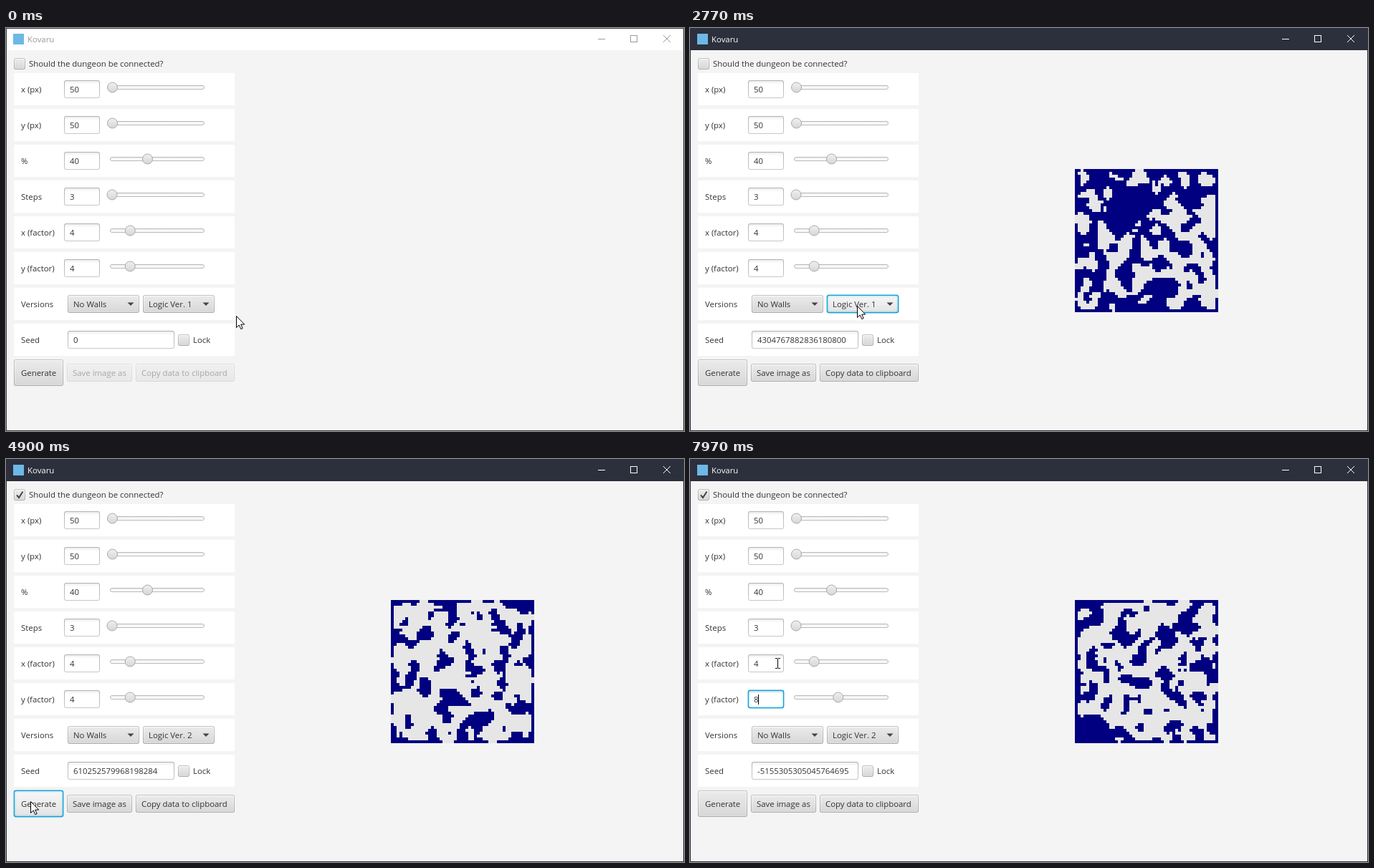
Recreate the animation shown at these times as an HTML page. Size 946 by 563 pixels, loop 8000 ms.

```html
<!DOCTYPE html>
<html lang="en">
<head>
<meta charset="utf-8">
<title>Dungeon generator</title>
<style>
  html, body { margin: 0; width: 100%; height: 100%; overflow: hidden; background: #f4f4f4; }
  svg { display: block; width: 946px; height: 563px; }
  text { font: 11.4px "Open Sans", "Noto Sans", sans-serif; fill: #333; white-space: pre; }
  .ring { display: none; fill: none; stroke: #039ed3; }
  .ring.on { display: inline; }
  .crisp { shape-rendering: crispEdges; }
</style>
</head>
<body>
<svg id="stage" viewBox="0 0 946 563"></svg>
<script>
const LOOP = 8000;
const stage = document.getElementById('stage');
const $ = id => document.getElementById(id);

// ---------- markup helpers ----------
const rect = (x, y, w, h, fill, more = '') =>
  `<rect x="${x}" y="${y}" width="${w}" height="${h}" fill="${fill}" ${more}/>`;
const inset = (d, x, y, w, h, fill, more) => rect(x + d, y + d, w - 2 * d, h - 2 * d, fill, more);
const text = (x, y, s, more = '') => `<text x="${x}" y="${y}" ${more}>${s}</text>`;
const gradient = (id, from, to, end = 1) => `<linearGradient id="${id}" x2="0" y2="1">
  <stop stop-color="${from}"/><stop offset="${end}" stop-color="${to}"/></linearGradient>`;

const ring = (id, ...box) => `<g class="ring" id="${id}Ring">
  ${inset(.4, ...box, 'none', 'rx="2.6" stroke-width="1.2"')}
  ${inset(.8, ...box, 'none', 'rx="2.2" stroke-width="4.4" opacity=".13"')}</g>`;

const buttons = {}, fields = [];
function button(id, ...box) {
  buttons[id] = box;
  return inset(0, ...box, 'url(#edge)', 'rx="3"') + inset(1, ...box, 'url(#shine)', 'rx="2"') +
    inset(2, ...box, 'url(#face)', `rx="1.5" id="${id}Face"`) + ring(id, ...box);
}
const labelled = (id, x, y, w, h, pad, s) =>
  `<g id="${id}">${button(id, x, y, w, h)}${text(x + pad, y + (h - 1) / 2 + 5, s)}</g>`;
const combo = (id, x, s) => button(id, x, 373, 100, 25) +
  text(x + 8, 390, s, `id="${id}Text"`) + `<path d="M${x + 83.5} 383.500h9l-4.500 4.500z" fill="#444"/>`;

function field(id, x, y, w, value) {
  const box = [x, y, w, 25];
  fields.push(box);
  return inset(0, ...box, 'url(#fieldEdge)', 'rx="3"') + inset(1, ...box, 'url(#well)', 'rx="2"') +
    ring(id, ...box) + rect(x + 7, y + 5, 8, 15, '#0096c9', `id="${id}Sel" display="none"`) +
    text(x + 8, y + 17, value, `id="${id}Text"`);
}
const slider = (id, y, at) =>
  rect(145.5, y + 17.5, 131, 5, 'url(#groove)', 'rx="2.5" stroke="#b8b8b8"') +
  `<circle id="${id}Thumb" cx="${at}" cy="${y + 20}" r="7" fill="url(#thumb)" stroke="#aaa"/>`;

// ---------- window ----------
const thumbX = factor => 148 + 8.4 * (factor - 1);
const rows = [
  ['x (px)', 'w', 50, 148.5], ['y (px)', 'h', 50, 148.5], ['%', 'p', 40, 197.5],
  ['Steps', 's', 3, 148], ['x (factor)', 'xf', 4, thumbX(4)], ['y (factor)', 'yf', 4, thumbX(4)],
  ['Versions'], ['Seed']
].map(([name, id, value, at], i) => {
  const y = 63 + 50 * i;
  return rect(11, y, 308, 45, '#fff') + text(21, y + 27, name) +
    (id ? field(id, 81, y + 10, 50, value) + slider(id, y, at) : '');
}).join('');

stage.innerHTML = `<defs>
    ${gradient('edge', '#c2c2c2', '#a9a9a9')}
    ${gradient('shine', '#fbfbfb', '#e0e0e0')}
    ${gradient('face', '#eaeaea', '#d8d8d8')}
    ${gradient('lit', '#f6f6f6', '#e5e5e5')}
    ${gradient('fieldEdge', '#b2b2b2', '#c8c8c8')}
    ${gradient('well', '#ededed', '#fff', .2)}
    ${gradient('groove', '#eee', '#fff')}
    ${gradient('thumb', '#f0f0f0', '#d6d6d6')}
  </defs>
  ${rect(0, 0, 946, 563, '#f4f4f4')}
  ${rect(0, 0, 946, 31, '#fff', 'id="bar"')}
  ${rect(.5, .5, 945, 562, 'none', 'id="frame"')}
  ${rect(10, 8, 15, 15, '#6db8e6')}
  ${text(30, 20, 'Kovaru', 'id="title"')}
  <g id="winIcons" fill="none">
    <path class="crisp" d="M826 15.500h10M871.500 10.500h9v9h-9z"/>
    <path d="M917 10l10 10M927 10l-10 10"/>
  </g>
  ${button('connect', 11, 42, 16, 16)}
  <path id="tick" d="M15 50.300l3 3.700 5.500-8.500" fill="none" stroke="#444" stroke-width="2"/>
  ${text(32, 54, 'Should the dungeon be connected?')}
  ${rows}
  ${combo('walls', 86, 'No Walls')}
  ${combo('logic', 191, '')}
  ${field('seed', 86, 423, 149, 0)}
  ${button('lock', 240, 428, 16, 16)}
  ${text(261, 440, 'Lock')}
  ${labelled('gen', 11, 463, 69, 37, 10, 'Generate')}
  ${labelled('save', 85, 469, 91, 25, 8, 'Save image as')}
  ${labelled('copy', 181, 469, 138, 25, 8, 'Copy data to clipboard')}
  ${rect(95, 329, 1, 14, '#000', 'id="caret"')}
  <g id="map" class="crisp">${rect(537, 197, 200, 200, '#e6e6e6')}<path id="cells" fill="#000080"/></g>
  <path id="arrow" d="M.5.500v16l3.700-3.500 2.600 5.600 2.400-1.100-2.500-5.400h5z" fill="#fff" stroke="#000"/>
  <path id="beam" class="crisp" d="M-3-7h3M1-7h3M.5-6.500v13M-3 7h3M1 7h3" fill="none" stroke="#000"/>`;

// ---------- caves: seeded noise smoothed by a cellular automaton ----------
function randomFrom(seed) {
  let n = [...seed].reduce((a, c) => Math.imul(a, 31) + c.charCodeAt(0) | 0, 7);
  return () => {
    n = n + 0x6d2b79f5 | 0;
    let v = Math.imul(n ^ n >>> 15, n | 1);
    v ^= v + Math.imul(v ^ v >>> 7, v | 61);
    return ((v ^ v >>> 14) >>> 0) / 2 ** 32;
  };
}

// solid: x, y and radius of the largest block of wall
function carve(seed, density, [sx, sy, r] = [0, 0, 1]) {
  const N = 50, random = randomFrom(seed);
  const make = rule => Array.from({ length: N * N }, (_, i) => rule(i % N, i / N | 0));
  let grid = make((x, y) => random() < density + (Math.hypot(x - sx, y - sy) < r ? .3 : 0));
  for (let step = 0; step < 2; step++) {
    const old = grid;
    const wall = (x, y) => x < 0 || y < 0 || x >= N || y >= N || old[y * N + x];
    grid = make((x, y) => {
      let count = 0;
      for (let k = 0; k < 9; k++) count += wall(x + k % 3 - 1, y + (k / 3 | 0) - 1);
      return count > 4;
    });
  }
  return grid.map((on, i) =>
    on ? `M${537 + i % N * 4} ${197 + (i / N | 0) * 4}h4v4h-4z` : '').join('');
}

// ---------- timeline ----------
const steps = [
  [0, { active: false, focus: '', map: null, ready: false,
        logic: 1, checked: false, selected: false, yf: 4 }],
  [570, { active: true }], [830, { ready: true }],
  [2770, { focus: 'logic' }], [3230, { logic: 2 }],
  [4070, { focus: 'connect' }], [4130, { checked: true }],
  [7370, { focus: 'yf' }], [7470, { selected: true }],
  [7700, { selected: false, yf: 8 }]
];

// Each click on Generate: press time, time the cave appears, seed, solid block
[
  [570, 770, '-1561060804836828051', [24, 46, 7]],
  [1270, 1330, '2870416395518204713'],
  [1670, 1740, '-7315920468271105942'],
  [2330, 2370, '4304767882836180800', [19, 12, 7]],
  [4630, 4700, '610252579968198284'],
  [4900, 5370, '3948201756630917425'],
  [6030, 6100, '-6723859681633688976', [6, 40, 10]],
  [6700, 6770, '-5155305305045764695', [5, 47, 7]]
].forEach(([press, done, seed, solid]) => {
  const map = { seed, path: carve(seed, press < 4000 ? .48 : .44, solid) };
  steps.push([press, { focus: 'gen' }], [done, { focus: 'connect', map }]);
});
steps.sort((a, b) => a[0] - b[0]);

// Pointer glides: start, end, then the place it rests
const glides = [
  [0, 400, 67, 486], [570, 630, 65, 487], [970, 1070, 58, 483], [1900, 2100, 47, 478],
  [2370, 2530, 233, 388], [2900, 3100, 240, 418], [3340, 3970, 14, 47],
  [4130, 4450, 38, 498], [4450, 4600, 34, 478], [5540, 5700, 38, 476], [6270, 6500, 50, 478],
  [6800, 7330, 106, 337], [7400, 7560, 66, 341], [7700, 7960, 122, 285]
];

function pointer(t) {
  let x = 321, y = 402;
  for (const [from, to, tx, ty] of glides) {
    const u = Math.min(1, Math.max(0, (t - from) / (to - from)));
    const k = u * u * (3 - 2 * u);
    x += (tx - x) * k;
    y += (ty - y) * k;
  }
  return [Math.round(x), Math.round(y)];
}

const set = (id, name, value) => $(id).setAttribute(name, value);
const show = (id, on) => set(id, 'display', on ? 'inline' : 'none');
const write = (id, s) => { if ($(id).textContent !== s) $(id).textContent = s; };
let drawn;

function render(t) {
  const s = Object.assign({}, ...steps.filter(([at]) => at <= t).map(([, patch]) => patch));
  const [x, y] = pointer(t);
  const over = ([bx, by, w, h]) => x >= bx && x < bx + w && y >= by && y < by + h;

  const ink = s.active ? '#fff' : '#999';
  set('bar', 'fill', s.active ? '#2c2f3c' : '#fff');
  set('frame', 'stroke', s.active ? '#2c2f3c' : '#3c3c3c');
  $('title').style.fill = ink;
  set('winIcons', 'stroke', ink);

  for (const id in buttons)
    set(id + 'Face', 'fill', s.active && over(buttons[id]) ? 'url(#lit)' : 'url(#face)');
  for (const el of document.querySelectorAll('.ring'))
    el.classList.toggle('on', el.id === s.focus + 'Ring');
  for (const id of ['save', 'copy']) set(id, 'opacity', s.ready ? 1 : .4);

  show('tick', s.checked);
  write('logicText', 'Logic Ver. ' + s.logic);
  write('seedText', s.map ? s.map.seed : '0');
  write('yfText', String(s.yf));
  $('yfText').style.fill = s.selected ? '#fff' : '';
  show('yfSel', s.selected);
  show('caret', s.focus === 'yf' && !s.selected);
  set('yfThumb', 'cx', thumbX(s.yf));

  show('map', s.map);
  if (s.map && s.map !== drawn) set('cells', 'd', (drawn = s.map).path);

  const typing = fields.some(over);
  show('arrow', !typing);
  show('beam', typing);
  set(typing ? 'beam' : 'arrow', 'transform', `translate(${x} ${y})`);
}

const start = performance.now();
function frame() {
  render((performance.now() - start) % LOOP);
  requestAnimationFrame(frame);
}
frame();
</script>
</body>
</html>
```
